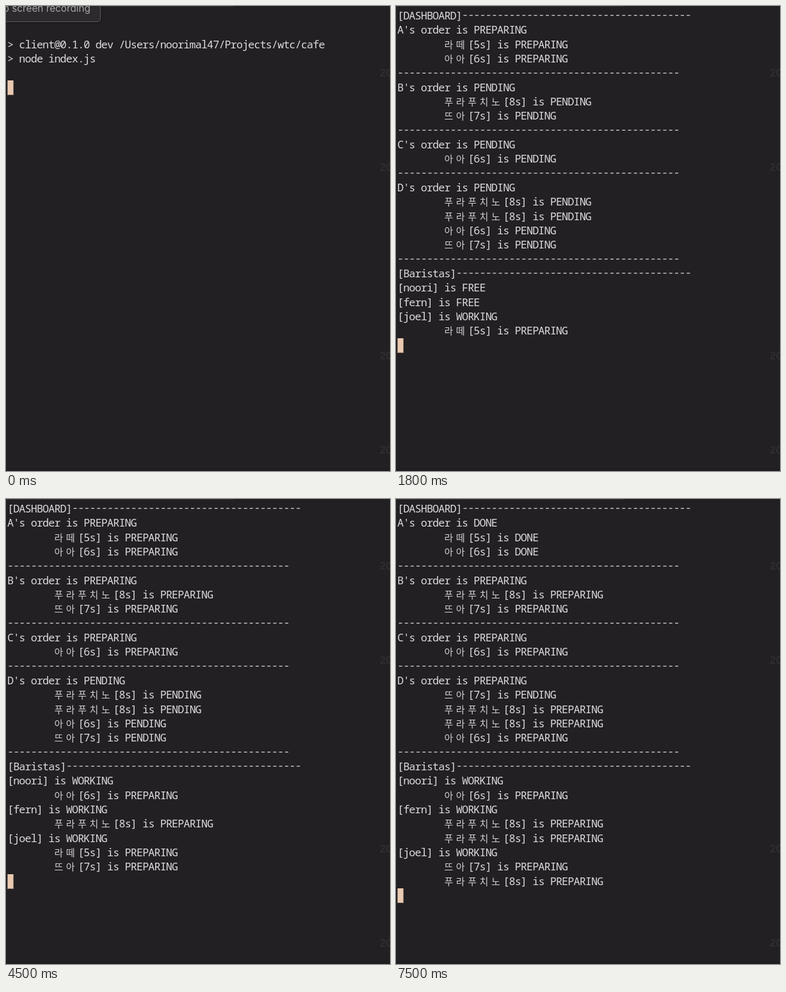
An HTML page for the animation above (8000 ms loop, 600x725 px).

```html
<!DOCTYPE html>
<html lang="ko">
<head>
<meta charset="utf-8">
<title>Cafe terminal</title>
<style>
  html, body {
    margin: 0;
    width: 100%;
    height: 100%;
    overflow: hidden;
    background: #222022;
  }
  #stage {
    position: relative;
    width: 600px;
    height: 725px;
    overflow: hidden;
    background: #222022;
  }
  #stage > * { position: absolute; }
  .edge { left: 0; top: 0; width: 356px; height: 1px; background: #383638; }
  .base { left: 0; bottom: 0; width: 600px; height: 4px; background: #1f1d1f; }
  .ghost {
    left: 584px;
    font: bold 17px/20px "Liberation Sans", Arial, sans-serif;
    color: #302e30;
  }
  #term {
    left: 2px;
    top: 4px;
    color: #dddbdd;
    font: 16.8px/22.33px "Noto Sans Mono", "DejaVu Sans Mono", monospace;
    letter-spacing: -.89px;
    font-variant-ligatures: none;
    white-space: pre;
  }
  .row { height: 22.33px; }
  .dash { position: relative; top: -1.8px; color: #cfcdcf; }
  .ko {
    display: inline-block;
    width: 18.38px;
    line-height: 0;
    font-family: "Noto Sans CJK KR", "Noto Sans CJK", sans-serif;
    font-size: 15px;
    font-weight: 300;
    color: #d0ced0;
  }
  #cursor {
    box-sizing: border-box;
    left: 2px;
    width: 10px;
    height: 23px;
    border: solid rgba(233, 201, 176, .6);
    border-width: 0 1px 1px;
    background: #e9c9b0 padding-box;
  }
  #tip {
    left: -60px;
    top: -20px;
    width: 206px;
    height: 43px;
    border: 1px solid #5b595b;
    border-radius: 5px;
    background: #2c2a2c;
    box-shadow: 0 1px 4px rgba(0, 0, 0, .35);
    color: #a8a6a8;
    font: 15.3px/20px Inter, sans-serif;
    white-space: nowrap;
  }
  #tip span { position: absolute; right: 15px; top: 13px; }
</style>
</head>
<body>
<div id="stage">
  <div class="ghost" style="top:95px">20</div>
  <div class="ghost" style="top:242px">20</div>
  <div class="ghost" style="top:536px">20</div>
  <div class="ghost" style="top:683px">20</div>
  <div class="edge"></div>
  <div class="base"></div>
  <div id="term"></div>
  <div id="cursor"></div>
  <div id="tip"><span>Stop screen recording</span></div>
</div>
<script>
const LOOP = 8000, PITCH = 22.33, TOP = 4.35;
const MENU = { L: "라떼[5s]", A: "아아[6s]", F: "푸라푸치노[8s]", D: "뜨아[7s]" };
const STATUS = { ".": "PENDING", "+": "PREPARING", "!": "DONE" };

// Each step: start time, orders of customers A to D, baristas with their drinks.
const STEPS = [
  [500, "A. L+|F. D.|A.|F. F. A. D.", "joel|noori|fern"],
  [1500, "L+ A+|F. D.|A.|F. F. A. D.", "noori|fern|joel L"],
  [2500, "L+ A+|D. F+|A.|F. F. A. D.", "fern|joel L|noori A"],
  [3500, "L+ A+|F+ D+|A.|F. F. A. D.", "joel L|noori A|fern F"],
  [4500, "L+ A+|F+ D+|A+|F. F. A. D.", "noori A|fern F|joel L D"],
  [5500, "L! A+|F+ D+|A+|F. A. D. F+", "fern F|joel D|noori A A"],
  [6500, "L! A+|F+ D+|A+|A. D. F+ F+", "joel D|noori A A|fern F F"],
  [7500, "L! A!|F+ D+|A+|D. F+ F+ A+", "noori A|fern F F|joel D F"]
];

const dashes = n => "-".repeat(n);
const drink = ([kind, mark]) => " ".repeat(8) + MENU[kind] + " is " + STATUS[mark];

function orderStatus(items) {
  if (items.every(i => i[1] === "!")) return "DONE";
  return items.every(i => i[1] === ".") ? "PENDING" : "PREPARING";
}

function board(orders, baristas) {
  const rows = ["[DASHBOARD]" + dashes(39)];
  orders.split("|").forEach((order, i) => {
    const items = order.split(" ");
    rows.push("ABCD"[i] + "'s order is " + orderStatus(items), ...items.map(drink), dashes(48));
  });
  rows.push("[Baristas]" + dashes(40));
  baristas.split("|").forEach(entry => {
    const [name, ...work] = entry.split(" ");
    rows.push(`[${name}] is ${work.length ? "WORKING" : "FREE"}`, ...work.map(k => drink(k + "+")));
  });
  return rows;
}

const intro = [
  "", "",
  "> client@0.1.0 dev /Users/noorimal47/Projects/wtc/cafe",
  "> node index.js",
  ""
];
const screens = [[0, intro], ...STEPS.map(([at, o, b]) => [at, board(o, b)])];

const markup = row => '<div class="row">' + row
  .replace(/>/g, "&gt;")
  .replace(/[가-힣]/g, '<span class="ko">$&</span>')
  .replace(/-{5,}/g, '<span class="dash">$&</span>') + "</div>";

const term = document.getElementById("term");
const cursor = document.getElementById("cursor");
const tip = document.getElementById("tip");
let shown = -1;

function draw() {
  const t = performance.now() % LOOP;
  const now = screens.filter(([at]) => at <= t).length - 1;
  if (now !== shown) {
    const rows = screens[now][1];
    term.innerHTML = rows.map(markup).join("");
    cursor.style.top = Math.round(TOP + rows.length * PITCH) + "px";
    shown = now;
  }
  tip.style.opacity = t < 1600 ? 1 : t < 1700 ? 0.6 : t < 1800 ? 0.25 : 0;
  requestAnimationFrame(draw);
}
draw();
</script>
</body>
</html>
```
